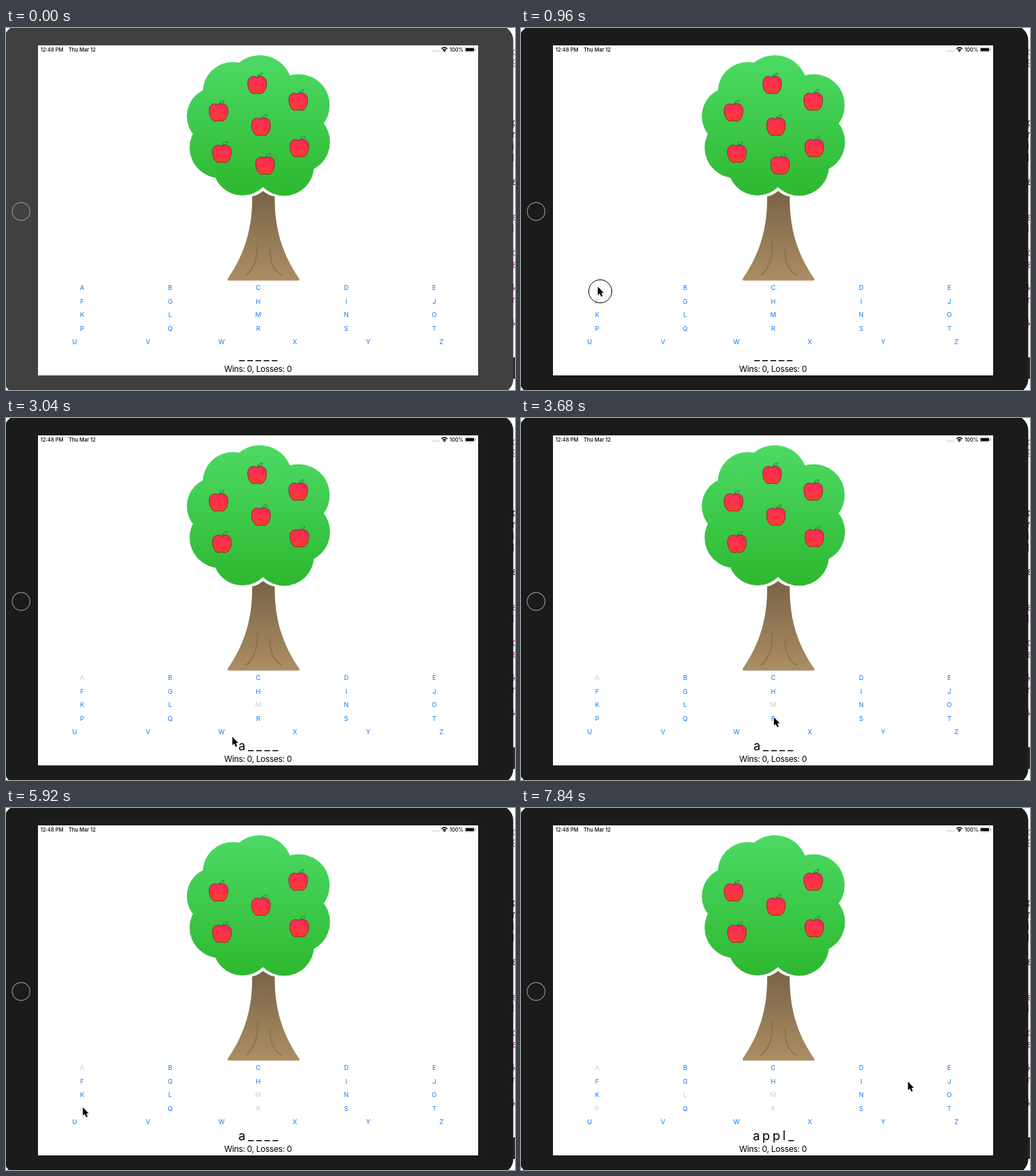
These frames come from a looping animation (732x521 px, 8 s). An HTML page:

```html
<!DOCTYPE html>
<html lang="en">
<head>
<meta charset="utf-8">
<title>Apple tree word game</title>
<style>
  html, body { margin: 0; width: 100%; height: 100%; overflow: hidden; background: #fff; }
  svg { display: block; width: 732px; height: 521px; font-family: Inter, Roboto, "Liberation Sans", sans-serif; }
  .status { font-size: 7.4px; font-weight: 500; }
  .keys { font-size: 9.3px; fill: #0a7cff; text-anchor: middle; }
  .keys .pressed { opacity: .2; }
  .keys .used { fill: #cdcdcd; }
  #word { font-size: 18px; letter-spacing: -.75px; text-anchor: middle; }
  #score { font-size: 12px; letter-spacing: -.35px; text-anchor: middle; }
  .code { font-size: 14px; }
</style>
</head>
<body>
<svg viewBox="0 0 732 521">
  <defs>
    <linearGradient id="leaves" gradientUnits="userSpaceOnUse" x1="0" y1="39" x2="0" y2="242">
      <stop stop-color="#4cda65"/><stop offset="1" stop-color="#2eb82f"/>
    </linearGradient>
    <linearGradient id="bark" x1="0" y1="0" x2="0" y2="1">
      <stop stop-color="#786346"/><stop offset="1" stop-color="#ac8e64"/>
    </linearGradient>
    <linearGradient id="skin" x1="0" y1="0" x2="0" y2="1">
      <stop stop-color="#fb2a5c"/><stop offset="1" stop-color="#ff3b30"/>
    </linearGradient>
    <g id="apple">
      <path d="M0-10C-4-13-13.5-13-13.5-2C-13.5 6-9.5 13.2-5 13.2C-2.5 13.2-2 12.6 0 12.6S2.5 13.2 5 13.2C9.5 13.2 13.5 6 13.5-2C13.5-13 4-13 0-10Z" fill="url(#skin)" stroke="#8f1f2c" stroke-width=".9"/>
      <path d="M6.5-9Q10-8 10.5-4" fill="none" stroke="#a52336" stroke-width=".8"/>
      <path d="M0-9.5Q.3-12.5 2-14" fill="none" stroke="#5d4a2a"/>
      <path d="M2-12.5Q2.5-16.5 8-16.5Q7.5-12 2-12.5Z" fill="#43d45b" stroke="#2b6b35" stroke-width=".8"/>
    </g>
  </defs>

  <rect width="732" height="521" fill="#fff"/>
  <g id="code" class="code"></g>
  <rect x="728" y="474" width="4" height="31" fill="#2b2b2d"/>

  <rect id="bezel" x="-3" y="-4" width="732.5" height="531" rx="22"/>
  <circle cx="21.7" cy="264" r="12.8" fill="none" stroke="#8c8c8c" stroke-width="1.2"/>
  <rect x="46" y="25" width="633" height="475" fill="#fff"/>

  <g class="status">
    <text x="49.7" y="33.7">12:48 PM</text>
    <text x="90" y="33.7">Thu Mar 12</text>
    <text x="638" y="33.7">100%</text>
  </g>
  <path d="M613.5 33.2h9.5" stroke="#aaa" stroke-width="1.3" stroke-dasharray="1.5 1.2"/>
  <g fill="none" stroke="#000" stroke-width="1.4">
    <path d="M626.3 30Q630.5 26 634.7 30M628 31.9Q630.5 29.6 633 31.9"/>
    <circle cx="630.5" cy="33.3" r=".5"/>
  </g>
  <rect x="660" y="28" width="14" height="6.2" rx="1.7" fill="none" stroke="#888" stroke-width=".6"/>
  <rect x="661" y="29" width="12" height="4.2" rx=".9"/>
  <rect x="674.8" y="30" width="1" height="2.2" rx=".5" fill="#888"/>

  <g fill="url(#leaves)">
    <rect x="300" y="85" width="130" height="125"/>
    <circle cx="365" cy="86" r="46.8"/>
    <circle cx="326" cy="92" r="43"/>
    <circle cx="302" cy="127" r="42"/>
    <circle cx="308" cy="172" r="44"/>
    <circle cx="340" cy="198.5" r="42.5"/>
    <circle cx="400" cy="198.5" r="43"/>
    <circle cx="422" cy="164" r="44"/>
    <circle cx="421" cy="111" r="44.5"/>
  </g>
  <path d="M369.7 234.5Q362 241 354 242.5C354.5 290 342.5 326 319.3 360Q317.5 363.5 321 363.5H420Q423.5 363.5 421.3 360C398 326 386 290 386.5 242.5Q377 241 369.7 234.5Z" fill="url(#bark)" stroke="#fff" stroke-width="6" paint-order="stroke"/>
  <path d="M361.5 307C362 330 358 345 345 356M379.5 318C380 338 384 348 396.5 356" fill="none" stroke="#8b7049" stroke-width="1.7"/>
  <g id="apples">
    <use href="#apple" x="372.6" y="197.4"/>
    <use href="#apple" x="361.2" y="81.4"/>
    <use href="#apple" x="420.3" y="105.4"/>
    <use href="#apple" x="305.7" y="120.9"/>
    <use href="#apple" x="366.7" y="141.4"/>
    <use href="#apple" x="310.5" y="180.4"/>
    <use href="#apple" x="421.8" y="172.4"/>
  </g>

  <g id="keys" class="keys"></g>
  <text id="word" x="362.5" y="477.7"></text>
  <text id="score" x="362.3" y="494.7">Wins: 0, Losses: 0</text>

  <g id="cursor">
    <circle id="ring" cx="4" cy="7.5" r="16.6" fill="#fff" fill-opacity=".6" stroke="#000"/>
    <path d="M.5.8V13L3.2 10.5L5.3 15.2L7.4 14.3L5.4 9.7H9Z" stroke="#fff" stroke-width="1.4" stroke-linejoin="round" paint-order="stroke"/>
  </g>
</svg>
<script>
  const LOOP = 8000, STEP = 160;
  const ANSWER = 'apple';
  const $ = id => document.getElementById(id);

  function addText(parent, x, y, text) {
    const node = document.createElementNS('http://www.w3.org/2000/svg', 'text');
    node.setAttribute('x', x);
    node.setAttribute('y', y);
    node.textContent = text;
    return $(parent).appendChild(node);
  }

  // Slivers of the editor behind the tablet, one letter per line
  [...'c9    pril e  el ce kr k'].forEach((c, i) => {
    addText('code', 727.5, 39 + 17 * i, c).style.fill = i < 2 ? '#777' : i < 14 ? '#111' : '#9b2393';
  });

  // Four rows of five keys, then one of six
  const keys = {};
  [...'ABCDEFGHIJKLMNOPQRSTUVWXYZ'].forEach((c, i) => {
    const last = i >= 20;
    const x = last ? 98.8 + 105.5 * (i - 20) : 109.5 + 126.6 * (i % 5);
    const y = 374 + 19.45 * (last ? 4 : Math.floor(i / 5));
    keys[c] = { x, y, node: addText('keys', x, y + 3.3, c) };
  });

  const clicks = [['A', 960], ['M', 2400], ['R', 3840], ['P', 5760], ['L', 6880]]
    .map(([c, down]) => ({ c, down, up: down + STEP, used: down + 2 * STEP }));
  const misses = clicks.filter(k => !ANSWER.includes(k.c.toLowerCase()));

  // The cursor rests on each clicked key and wanders through a few turning points
  const turns = [[160, 300, 521], [2080, 355, 422], [3040, 325, 458], [3360, 292, 440],
    [4600, 500, 432], [6360, 605, 372], [7260, 99, 430], [7840, 556, 393]];
  const rests = clicks.flatMap(({ c, down }) =>
    [down - 160, down + 240].map(t => [t, keys[c].x + .5, keys[c].y - 2.5]));
  const stops = [...turns, ...rests].sort((a, b) => a[0] - b[0]);

  function cursorAt(t) {
    const i = stops.findIndex(s => s[0] > t);
    if (i < 1) return stops.at(i).slice(1);
    const [t0, x0, y0] = stops[i - 1], [t1, x1, y1] = stops[i];
    const k = (t - t0) / (t1 - t0), ease = k * k * (3 - 2 * k);
    return [x0 + (x1 - x0) * ease, y0 + (y1 - y0) * ease];
  }

  const show = (node, on) => node.setAttribute('visibility', on ? 'visible' : 'hidden');

  function draw(t) {
    const used = clicks.filter(k => t >= k.used).map(k => k.c.toLowerCase());
    $('word').textContent = [...ANSWER].map(c => used.includes(c) ? c : '_').join(' ');
    for (const k of clicks)
      keys[k.c].node.setAttribute('class', t >= k.used ? 'used' : t >= k.down ? 'pressed' : '');
    misses.forEach((k, i) => show($('apples').children[i], t < k.used));

    // The first click brings the window to the front
    $('bezel').setAttribute('fill', t < clicks[0].down ? '#404040' : '#1b1b1b');
    $('cursor').setAttribute('transform', `translate(${cursorAt(t)})`);
    show($('cursor'), t >= stops[0][0]);
    show($('ring'), clicks.some(k => t >= k.down && t < k.up));
  }

  const start = performance.now();
  function tick() {
    const t = (performance.now() - start) % LOOP;
    draw(Math.floor(t / STEP) * STEP);
    requestAnimationFrame(tick);
  }
  tick();
</script>
</body>
</html>
```
